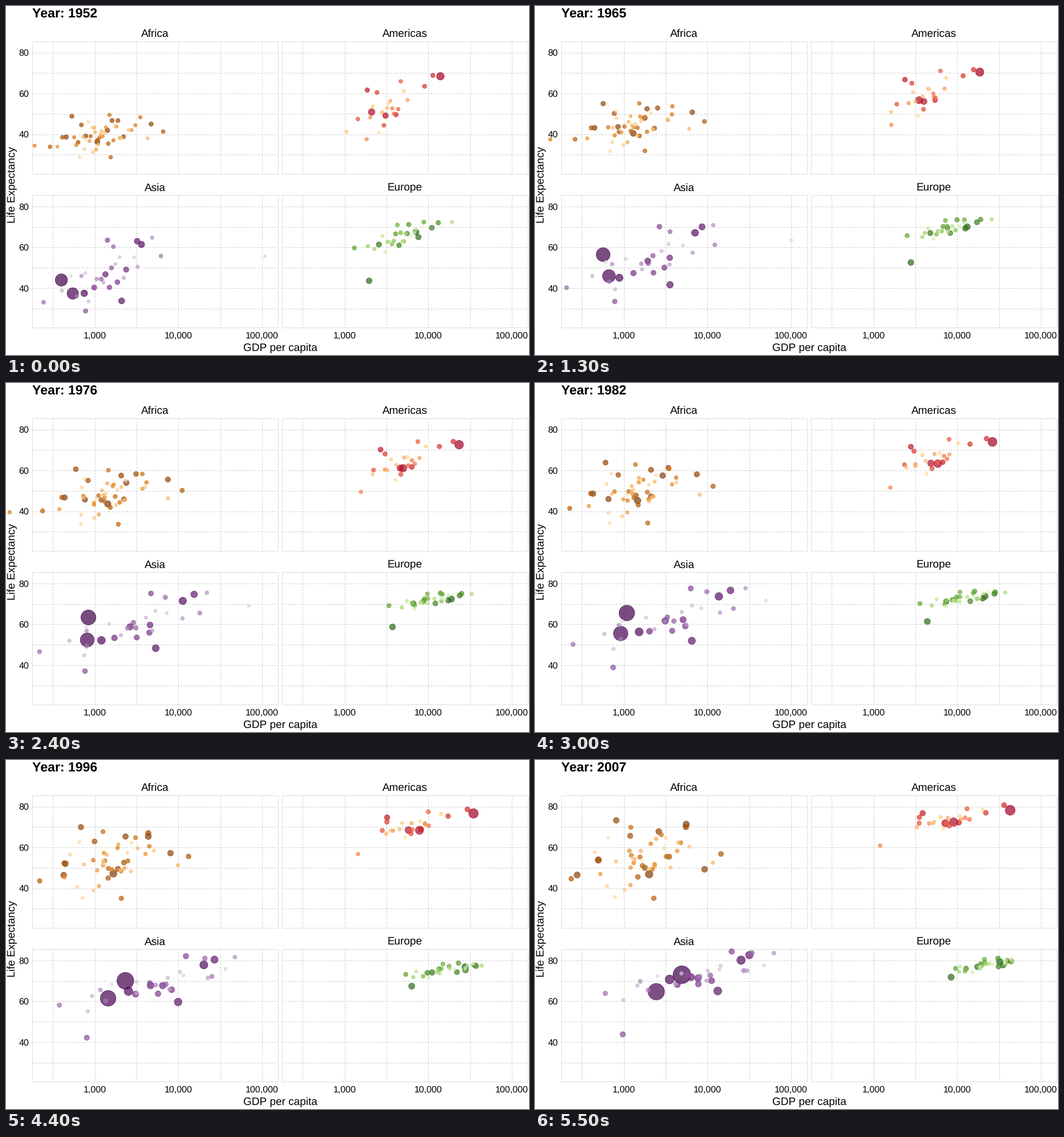
These frames come from a looping animation (917 px wide and 611 px high, 5600 ms). A matplotlib script:

```python
import numpy as np
import matplotlib.pyplot as plt
from matplotlib.animation import FuncAnimation
from matplotlib.colors import LinearSegmentedColormap
from matplotlib.patches import Rectangle

W, H, DPI = 917, 611, 64
PT = 72 / DPI                      # points per pixel
FIRST, LAST = 1952, 2007
KEYS = (FIRST, 1970, 1990, LAST)   # years at which courses bend
DECADE, YEAR_PX = 146.75, 3.577    # pixels per factor of ten / per year of life
PANEL_W, PANEL_H = 431.5, 232.5
LEFTS, TOPS = (45.5, 483.5), (61.5, 330.9)

plt.rcParams["font.family"] = "Liberation Sans"
plt.rcParams["text.hinting"] = "none"
plt.rcParams["text.hinting_factor"] = 1


def spread(rng, n):
    """Evenly filled bell curve in shuffled order."""
    p = (rng.permutation(n) + 0.5) / n
    return np.log(p / (1 - p)) / 1.75


class Cloud:
    """Correlated income/life scatter whose mean and spread follow the key years."""

    def __init__(self, n, seed, link, x, sx, y, sy):
        rng = np.random.default_rng(seed)
        self.rich, self.luck, self.fate = (spread(rng, n) for _ in range(3))
        self.link = link
        self.curves = x, sx, y, sy

    def at(self, year):
        x, sx, y, sy = (np.interp(year, KEYS, c) for c in self.curves)
        turn = 0.6 * (year - FIRST) / (LAST - FIRST)
        rich = self.rich * np.cos(turn) + self.fate * np.sin(turn)
        health = self.link * rich + np.sqrt(1 - self.link ** 2) * self.luck
        return np.column_stack([x + sx * rich, y + sy * health])


class Panel:
    """One facet: grid, a cloud of dots and a few leading dots by size rank."""

    def __init__(self, name, col, row, cloud, leads, ramp, big, tail, young):
        self.name, self.left, self.top = name, LEFTS[col], TOPS[row]
        self.cloud, self.leads, self.young = cloud, leads, young
        n = len(cloud.rich)
        first, rate = tail
        self.pop = np.append(big, first * np.exp(-rate * np.arange(n - len(big))))
        self.colors = LinearSegmentedColormap.from_list(name, ramp)(np.linspace(0, 1, n))

    def px(self, logx):
        return self.left + 110 + (logx - 3) * DECADE

    def py(self, life):
        return self.top + 20 + (80 - life) * YEAR_PX

    def at(self, year):
        pos = self.cloud.at(year)
        for rank, path in self.leads.items():
            income, life = np.array(path).T
            pos[rank] = (np.interp(year, KEYS, np.log10(income)),
                         np.interp(year, KEYS, life))
        u = (year - FIRST) / (LAST - FIRST)
        pop = self.pop * (self.young + (1 - self.young) * u)
        xy = np.column_stack([self.px(pos[:, 0]), self.py(pos[:, 1])])
        return xy, 2.45 + 13.1 * np.sqrt(pop / 1319)

    def draw_frame(self, ax):
        right, bottom = self.left + PANEL_W, self.top + PANEL_H
        grid = dict(color="#cdcdcd", lw=PT, ls=(0, (3, 2)), zorder=1)
        for logx in np.arange(2.5, 5.1, 0.5):
            ax.plot([self.px(logx)] * 2, [self.top, bottom], **grid)
        for life in range(30, 81, 10):
            ax.plot([self.left, right], [self.py(life)] * 2, **grid)
        ax.add_patch(Rectangle((self.left, self.top), PANEL_W, PANEL_H, fill=False,
                               ec="#dedede", lw=PT, zorder=2))
        label(ax, self.left + PANEL_W / 2, self.top - 7.5, self.name, 19.2)


def label(ax, x, y, s, size, ha="center", **kw):
    return ax.text(x, y, s, fontsize=size * PT, ha=ha, va="baseline", color="black", **kw)


# Leads: (income, life) at each key year.
panels = [
    Panel("Africa", 0, 0,
          Cloud(52, 11, 0.45,
                x=(3.05, 3.12, 3.14, 3.22), sx=(0.29, 0.34, 0.38, 0.41),
                y=(39.5, 46, 52.5, 55), sy=(5, 6, 8, 9)),
          {0: [(1077, 36.3), (1400, 42), (1510, 47.4), (2014, 46.9)],
           1: [(1419, 41.9), (1950, 50.4), (3820, 62.2), (5581, 71.3)],
           3: [(781, 39.1), (889, 45.4), (538, 46.4), (278, 46.5)],
           4: [(4725, 45), (7510, 53), (7450, 61.5), (9270, 49.3)]},
          ["#7F3B08", "#B35806", "#E08214", "#FDB863", "#FEE0B6"],
          [135], (80, 0.09), 0.25),
    Panel("Americas", 1, 0,
          Cloud(25, 5, 0.65,
                x=(3.49, 3.65, 3.72, 3.87), sx=(0.21, 0.21, 0.22, 0.25),
                y=(53, 62, 69, 73.5), sy=(8.5, 7, 4.8, 3.4)),
          {0: [(13990, 68.4), (20760, 71.2), (31000, 75.8), (42952, 78.2)],
           1: [(2109, 50.9), (4260, 58.9), (7270, 66.2), (9066, 72.4)],
           5: [(11367, 68.8), (17740, 72.7), (26250, 77.5), (36319, 80.7)],
           14: [(1840, 37.6), (1560, 47.3), (1610, 54.5), (1202, 60.9)]},
          ["#A50026", "#D73027", "#F46D43", "#FDAE61", "#FEE090"],
          [301, 190, 109], (44, 0.16), 0.45),
    Panel("Asia", 0, 1,
          Cloud(33, 8, 0.65,
                x=(3.2, 3.45, 3.7, 3.9), sx=(0.34, 0.46, 0.48, 0.45),
                y=(48, 57, 66.5, 72.5), sy=(9, 8, 6.5, 5)),
          {0: [(400, 44), (650, 61.2), (1540, 68.4), (4959, 73)],
           1: [(547, 37.4), (720, 49.2), (1085, 59.7), (2452, 64.7)],
           2: [(750, 37.5), (947, 48), (2107, 61.8), (3541, 70.7)],
           5: [(3217, 63), (12600, 72.7), (24750, 79.2), (31656, 82.6)],
           12: [(779, 28.8), (784, 35.3), (725, 41.3), (975, 43.8)],
           31: [(108382, 55.6), (97700, 66.5), (31800, 75), (47307, 77.6)]},
          ["#40004B", "#762A83", "#9970AB", "#C2A5CF", "#E7D4E8"],
          [1319, 1110], (224, 0.17), 0.4),
    Panel("Europe", 1, 1,
          Cloud(30, 3, 0.8,
                x=(3.7, 4.0, 4.15, 4.36), sx=(0.25, 0.22, 0.28, 0.22),
                y=(65.5, 71, 74, 77.8), sy=(4.6, 2.5, 2.4, 2.2)),
          {0: [(7144, 67.5), (16670, 71), (25450, 75.5), (32170, 79.4)],
           1: [(1969, 43.6), (3200, 56), (5430, 65), (8458, 71.8)]},
          ["#276419", "#4D9221", "#7FBC41", "#B8E186", "#E6F5D0"],
          [82], (71, 0.16), 0.75),
]

fig = plt.figure(figsize=(W / DPI, H / DPI), dpi=DPI, facecolor="white")
ax = fig.add_axes([0, 0, 1, 1])
ax.set_xlim(0, W)
ax.set_ylim(H, 0)
ax.axis("off")

for p in panels:
    p.draw_frame(ax)
for p in panels[::2]:
    for life in (40, 60, 80):
        label(ax, 40, p.py(life) + 5.7, str(life), 16, ha="right")
for p in panels[2:]:
    for power in (3, 4, 5):
        label(ax, p.px(power), 582, f"{10 ** power:,}", 16)
label(ax, 480.5, 604.5, "GDP per capita", 19.2)
label(ax, 15.8, 313, "Life Expectancy", 19.2, rotation=90, rotation_mode="anchor")
title = label(ax, 45.5, 20, "", 23.1, ha="left", weight="bold")

dots = []
for p in panels:
    xy, _ = p.at(FIRST)
    dots.append(ax.scatter(xy[:, 0], xy[:, 1], c=p.colors, alpha=0.7, edgecolors="face",
                           linewidths=0.9 * PT, zorder=3))


def update(i):
    year = FIRST + i
    title.set_text(f"Year: {year}")
    for p, d in zip(panels, dots):
        xy, r = p.at(year)
        d.set_offsets(xy)
        d.set_sizes((2 * r * PT) ** 2)
    return [title, *dots]


anim = FuncAnimation(fig, update, frames=LAST - FIRST + 1, interval=100,
                     init_func=lambda: update(0), repeat=True, repeat_delay=0)
plt.show()
```
